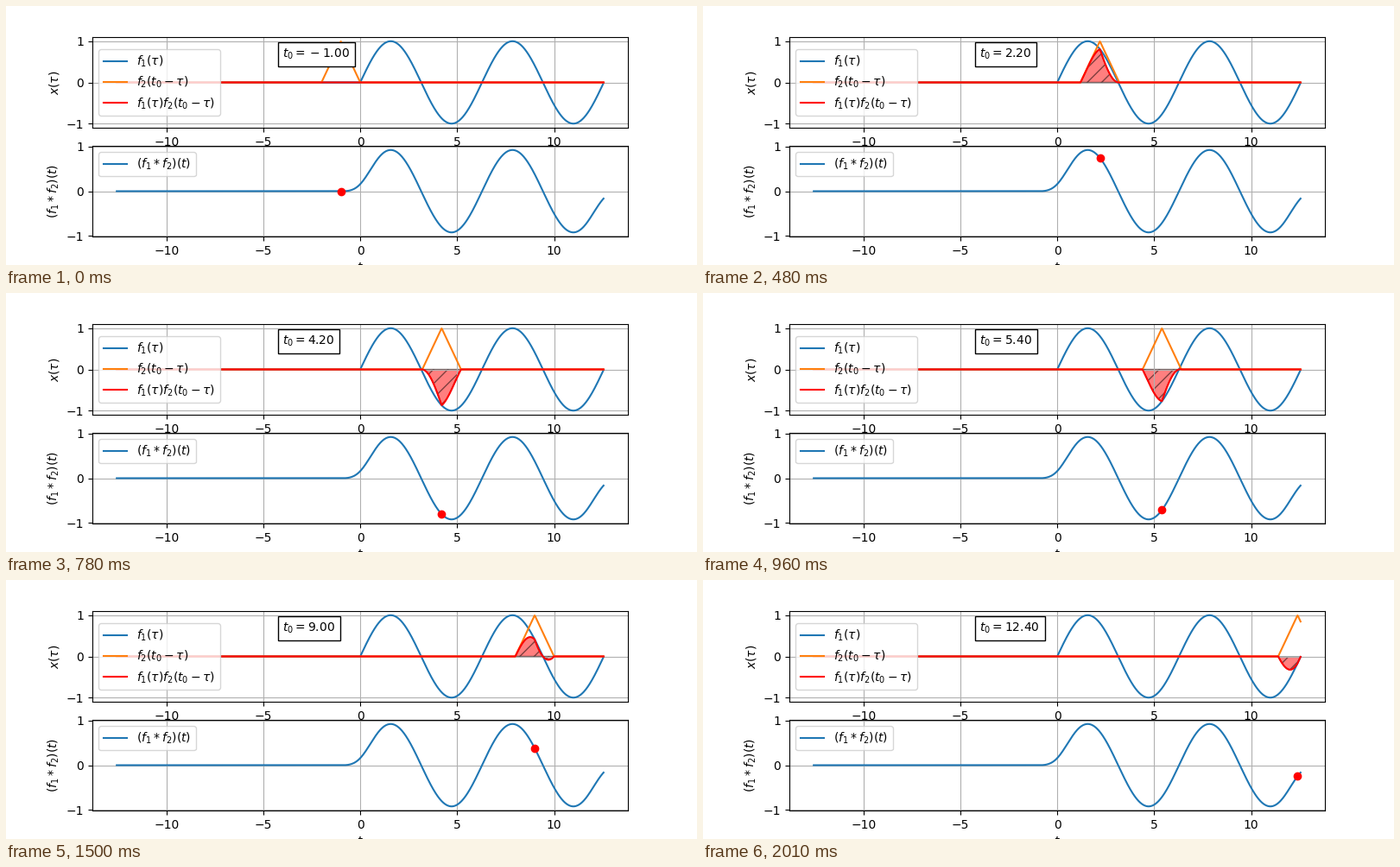
A matplotlib script for the animation above (2040 ms loop, 800x300 px).

```python
import matplotlib.pyplot as plt
import numpy as np
from matplotlib.animation import FuncAnimation

FS = 50
T = 4 * np.pi
t = np.arange(-T, T, 1 / FS)
shifts = np.arange(-1, T, 0.2)


def f1(x):
    return np.sin(x) * (x > 0)


def f2(x):
    return np.maximum(1 - np.abs(x), 0)


def product(shift):
    return f1(t) * f2(shift - t)


def convolve(shift):
    return np.trapezoid(product(shift), t)


fig, (top, bottom) = plt.subplots(2, 1, figsize=(8, 3), dpi=100)

# Signals, their product and its area
top.plot(t, f1(t), label=r"$f_1(\tau)$")
moving, = top.plot(t, f2(shifts[0] - t), label=r"$f_2(t_0-\tau)$")
area, = top.fill(t, product(shifts[0]), facecolor="r", edgecolor="black",
                 alpha=0.5, hatch="//")
overlap, = top.plot(t, product(shifts[0]), "r-",
                    label=r"$f_1(\tau)f_2(t_0-\tau)$")
readout = top.text(-4, 0.6, "", bbox=dict(fc="white"))
top.set_ylabel(r"$x(\tau)$")
top.legend(loc="center left")

# Convolution result with the current value
bottom.plot(t, [convolve(x) for x in t], label="$(f_1 * f_2)(t)$")
dot, = bottom.plot(shifts[:1], [convolve(shifts[0])], "ro")
bottom.set_xlabel("$t$")
bottom.set_ylabel("$(f_1 * f_2)(t)$")
bottom.legend(loc="upper left")

for ax in (top, bottom):
    ax.grid(True)
    ax.set_xlim(ax.get_xlim())
    ax.set_ylim(ax.get_ylim())


def update(i):
    shift = shifts[i]
    prod = product(shift)
    moving.set_ydata(f2(shift - t))
    overlap.set_ydata(prod)
    area.set_xy(np.column_stack([t, prod]))
    readout.set_text(f"$t_0={shift:.2f}$")
    dot.set_data([shift], [convolve(shift)])
    return moving, overlap, area, readout, dot


anim = FuncAnimation(fig, update, frames=len(shifts), interval=30,
                     repeat=True, repeat_delay=0)
plt.show()
```
